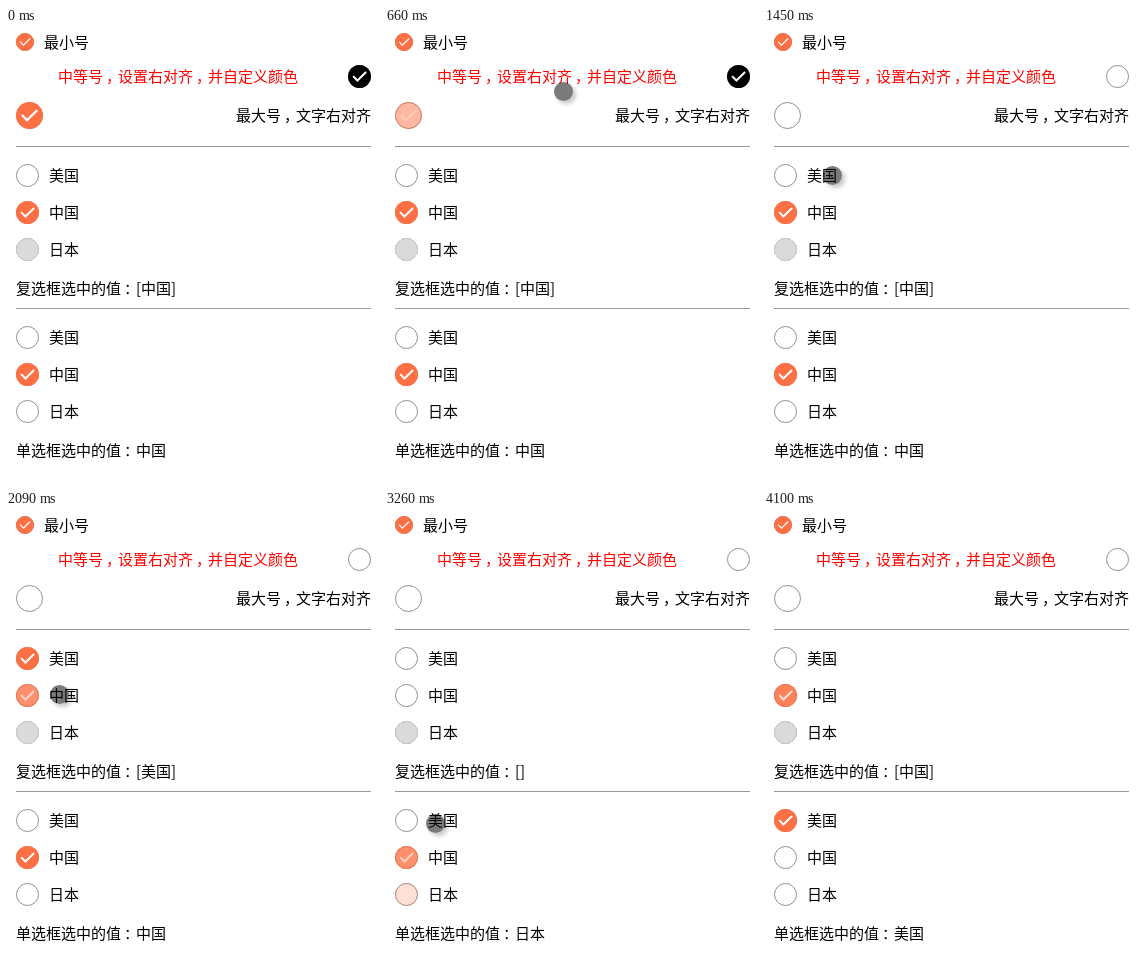
These frames come from a looping animation (373x455 px, 4.16 s). An HTML page:

```html
<!DOCTYPE html>
<html lang="zh-CN">
<head>
<meta charset="utf-8">
<style>
html, body { margin: 0; width: 100%; height: 100%; overflow: hidden; background: #fff; }
svg { position: absolute; left: 0; top: 0; }
text { font: 15px "Noto Sans CJK SC", "Noto Sans CJK", sans-serif; }
#pointer {
  position: absolute; left: -10px; top: -10px; width: 19px; height: 19px;
  border-radius: 50%; background: rgba(0, 0, 0, .52);
  box-shadow: 3px 3px 4px rgba(0, 0, 0, .22);
}
</style>
</head>
<body>
<svg id="stage" width="373" height="455"></svg>
<div id="pointer"></div>
<script>
const LOOP = 4160, STEP = 60, FADE = 340, LEAD = 40;
const ORANGE = '#fd7044', ROW = 37, NAMES = ['美国', '中国', '日本'];
const stage = document.getElementById('stage');
const pointer = document.getElementById('pointer');

function add(tag, attrs, parent = stage) {
  const el = document.createElementNS('http://www.w3.org/2000/svg', tag);
  for (const key in attrs) el.setAttribute(key, attrs[key]);
  return parent.appendChild(el);
}

// Full-width punctuation is nudged towards the middle of its cell
function write(el, content) {
  if (el.textContent === content) return;
  el.textContent = '';
  content.split(/([，：])/).forEach((part, i) => {
    add('tspan', { dx: i % 2 ? 3 : i && -3 }, el).textContent = part;
  });
}

function label(x, y, content, attrs = {}) {
  const el = add('text', { x, y: y + 5.5, ...attrs });
  write(el, content);
  return el;
}

function box(x, y, r, initial, { color = ORANGE, name, radio } = {}) {
  const g = add('g', { transform: `translate(${x} ${y})` });
  add('circle', { r: r - .5, fill: '#fff', stroke: '#909090' }, g);
  const disc = add('circle', { r, fill: color }, g);
  const tick = add('path', {
    d: 'M-6.4-.4L-2.1 4L6.6-4.5', transform: `scale(${r / 11.5})`,
    fill: 'none', stroke: '#fff', 'stroke-width': r < 10 ? 1.5 : 2
  }, g);
  return { disc, tick, initial, name, radio };
}

function group(top, radio) {
  return NAMES.map((name, i) => {
    const y = top + i * ROW;
    label(43, y, name);
    return box(21.5, y, 11.5, name === '中国', { name, radio });
  });
}

box(19, 14, 9, true);
label(38, 14.5, '最小号');
label(52, 48.5, '中等号，设置右对齐，并自定义颜色', { fill: '#f00' });
label(365, 87.5, '最大号，文字右对齐', { 'text-anchor': 'end' });
for (const y of [118.5, 280.5]) add('path', { d: `M10 ${y}H365`, stroke: '#999' });

const black = box(353.5, 48.5, 11.5, true, { color: '#000' });
const big = box(23.5, 87.5, 13.5, true);
const checks = group(147.5, false), radios = group(309.5, true);
const boxes = [black, big, ...checks, ...radios];
const checkText = label(10, 260.5, ''), radioText = label(10, 422.5, '');

// The disabled option covers its box
add('circle', { cx: 21.5, cy: 147.5 + 2 * ROW, r: 11, fill: '#dadada', stroke: '#cbcbcb' });

// Pointer stops: arrival, departure, place, and the box clicked on departure
const stop = (arrive, leave, x, y, target) => ({ arrive, leave, x, y, target });
const stops = [
  stop(0, 60, 322, 147),
  stop(540, 600, 171, 95, big),
  stop(720, 1030, 181, 53, black),
  stop(1150, 1150, 173, 77),
  stop(1450, 1650, 69, 148, checks[0]),
  stop(1890, 2090, 54, 184, checks[1]),
  stop(2270, 2400, 55, 150, checks[0]),
  stop(2760, 2760, 85, 390),
  stop(3000, 3260, 58, 388, radios[2]),
  stop(3260, 3500, 51, 313, radios[0]),
  stop(3740, 3920, 52, 184, checks[1]),
  stop(4080, LOOP, 360, 430)
];

const easeOut = p => 1 - (1 - p) ** 2;

function set(b, on, time) {
  if (b.on !== on) Object.assign(b, { on, since: time });
}

// Replays every click made so far
function replay(past) {
  for (const b of boxes) Object.assign(b, { on: b.initial, since: -FADE });
  for (const { target, leave } of past) {
    if (!target) continue;
    if (target.radio) radios.forEach(b => set(b, b === target, leave));
    else set(target, !target.on, leave);
  }
}

function paint(b, t) {
  const p = Math.min((t - b.since + LEAD) / FADE, 1);
  const alpha = b.on ? easeOut(p) : 1 - easeOut(p);
  b.disc.setAttribute('opacity', alpha);
  b.tick.setAttribute('opacity', alpha ** 2);
}

function movePointer(from, t) {
  const to = stops[stops.indexOf(from) + 1];
  const visible = from && t <= stops[stops.length - 1].arrive;
  pointer.style.display = visible ? 'block' : 'none';
  if (!visible) return;
  const p = t < to.arrive ? easeOut((t - from.leave) / (to.arrive - from.leave)) : 1;
  const x = from.x + (to.x - from.x) * p, y = from.y + (to.y - from.y) * p;
  pointer.style.transform = `translate(${Math.round(x)}px, ${Math.round(y)}px)`;
}

const chosen = list => list.filter(b => b.on).sort((a, b) => a.since - b.since).map(b => b.name).join();

function draw(time) {
  const past = stops.filter(s => s.leave <= time);
  const last = past[past.length - 1];
  const start = last ? last.leave : 0;
  const t = start + Math.floor((time - start) / STEP) * STEP;
  replay(past);
  boxes.forEach(b => paint(b, t));
  write(checkText, `复选框选中的值：[${chosen(checks)}]`);
  write(radioText, `单选框选中的值：${chosen(radios)}`);
  movePointer(last, t);
}

const began = performance.now();
function tick() {
  draw((performance.now() - began) % LOOP);
  requestAnimationFrame(tick);
}
tick();
</script>
</body>
</html>
```
